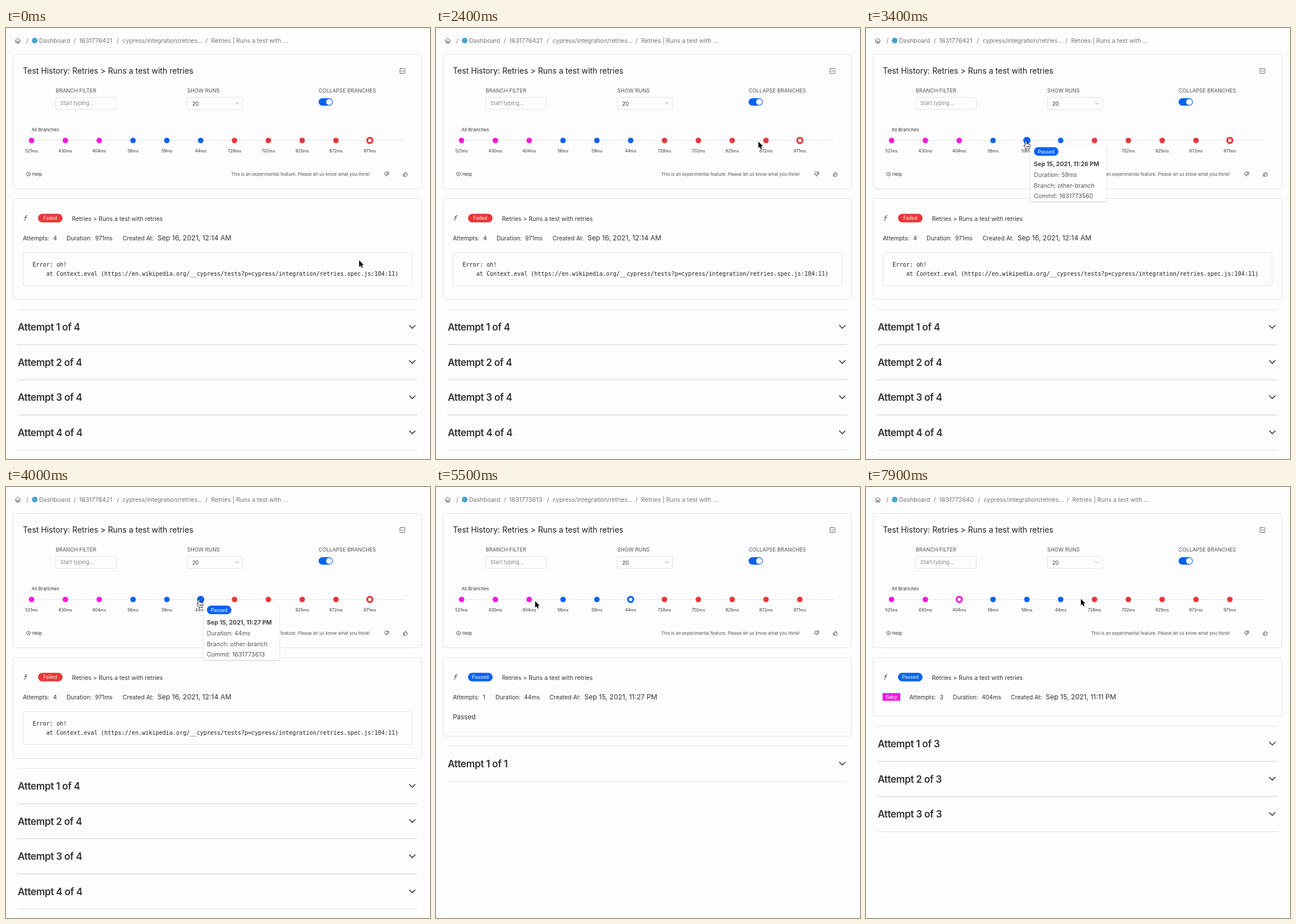
An HTML page that plays this animation: 742 px wide and 755 px high, repeating every 8000 ms.

```html
<!DOCTYPE html>
<html lang="en">
<head>
<meta charset="utf-8">
<title>Test history</title>
<style>
  html, body { margin: 0; width: 100%; height: 100%; overflow: hidden; background: #fdfcfe; }
  svg { display: block; width: 100vw; height: 100vh; fill: #333; }
  text { font-family: Inter, "Open Sans", sans-serif; }
  .mono { font-family: "DejaVu Sans Mono", monospace; fill: #222; }
  .line { fill: none; stroke: #e2e2e5; }
  .icon { fill: none; stroke: #555; stroke-width: .9; stroke-linejoin: round; stroke-linecap: round; }
  .heading { font-weight: 600; letter-spacing: -.4px; }
  .tip { fill: #fff; filter: drop-shadow(0 1px 1px #0003); }
</style>
</head>
<body>
<svg viewBox="0 0 742 755"><g id="page"></g><g id="live"></g></svg>
<script>
const LOOP = 8000, STEP = 100;
const RED = '#e83737', BLUE = '#0562f0', PINK = '#f21ade', GREY = '#777';
const durations = [521, 430, 404, 56, 59, 44, 728, 702, 925, 872, 971];
const dotX = i => 44.7 + 59.2 * i;
const dotColor = i => i < 3 ? PINK : i < 6 ? BLUE : RED;

// Details of the runs that are opened or hovered, by dot index
const runs = {
  2: { id: 1631772640, date: 'Sep 15, 2021, 11:11 PM', branch: 'tests-history-001', flaky: true,
       attempts: 3, bottom: 401.5, metaX: [76, 129, 152, 202.5, 253.5, 314.5] },
  4: { id: 1631773560, date: 'Sep 15, 2021, 11:26 PM', branch: 'other-branch' },
  5: { id: 1631773613, date: 'Sep 15, 2021, 11:27 PM', branch: 'other-branch',
       attempts: 1, bottom: 436.5, metaX: [29.5, 82, 104, 154, 198.5, 259.5] },
  9: { id: 1631776322, date: 'Sep 16, 2021, 12:12 AM', branch: 'tests-history-001', failed: true },
  10: { id: 1631776421, date: 'Sep 16, 2021, 12:14 AM', failed: true,
        attempts: 4, bottom: 475.5, metaX: [29.5, 82.5, 106, 156, 204, 265] }
};

// Pointer path: time, x, y
const path = [
  [0, 618, 407], [100, 617, 398], [700, 600, 200], [900, 599, 200], [1600, 576, 199], [1700, 576, 200],
  [2100, 579, 200], [2300, 581, 199], [3000, 278.5, 199], [3500, 280, 198], [3900, 337.5, 197],
  [4000, 337.5, 197], [4900, 335, 199], [5600, 164, 200], [6200, 165, 200], [7300, 166, 200],
  [7900, 376, 196], [8000, 376, 196]
];
// Time over a dot: start, end, dot
const hovers = [[1610, 2400, 9], [2980, 3600, 4], [3850, 5100, 5], [5550, 7400, 2]];
const TIP_DELAY = 80;
const selectedAt = t => t < 4400 ? 10 : t < 6000 ? 5 : 2;

const text = (x, y, size, str, attrs = '') =>
  `<text x="${x}" y="${y}" font-size="${size}" ${attrs}>${String(str).replace(/>/g, '&gt;')}</text>`;
const rect = (x, y, w, h, attrs) => `<rect x="${x}" y="${y}" width="${w}" height="${h}" ${attrs}/>`;
const circle = (x, y, r, attrs) => `<circle cx="${x}" cy="${y}" r="${r}" ${attrs}/>`;
const draw = (d, attrs, x = 0, y = 0, turn = 0) =>
  `<path d="${d}" transform="translate(${x} ${y}) rotate(${turn})" ${attrs}/>`;
const fill = c => `fill="${c}"`;
const centred = 'text-anchor="middle" ';
const icon = 'class="icon"', line = 'class="line"';

const statusBadge = (run, x, y) =>
  rect(x, y, 43, 15, `rx="7.5" fill="${run.failed ? RED : BLUE}"`) +
  text(x + 21.5, y + 10.8, 8.5, run.failed ? 'Failed' : 'Passed', centred + fill('#fff'));
const flakyBadge = (x, y, h) =>
  rect(x, y, 31, h, fill(PINK)) + text(x + 15.5, y + h / 2 + 3.2, 9.1, 'flaky', centred + fill('#fff'));

function page() {
  const thumb = 'M-3.4 -.4h1.6v4h-1.6zM-1.8 -.4L0 -3.6q1.4 0 1 1.7l-.3 1.2h2.6l-.6 3.7q-.2.6-.8.6h-3.7';
  return draw('M-4.5 .2L0 -4 4.5 .2M-3.3 -.6V4.3H3.3V-.6M-1 4.3V1.2H1V4.3', icon, 20.7, 21.8) +
    text(35.5, 26, 10.4, '/', fill(GREY)) +
    circle(50.2, 22, 5, fill('#48a3cf')) +
    text(58, 26, 10.5, 'Dashboard', fill(GREY)) + text(118.5, 26, 10.4, '/', fill(GREY)) +
    rect(12.5, 46.5, 715, 235, line + ' rx="3"') +
    text(29.5, 80.2, 13.86, 'Test History: Retries > Runs a test with retries', fill('#222')) +
    rect(689.5, 71, 8.6, 8.6, icon + ' rx="1"') + draw('M691.8 75.3h4', icon) +
    [[87, 'BRANCH FILTER'], [317, 'SHOW RUNS'], [547, 'COLLAPSE BRANCHES']]
      .map(([x, label]) => text(x, 113, 9.2, label, fill('#555'))).join('') +
    rect(87, 121.5, 106, 21, line + ' rx="2"') + text(95, 135.4, 9.2, 'Start typing...', fill('#888')) +
    rect(317, 121.5, 97, 21, line + ' rx="2"') + text(326, 135.6, 9.2, '20') +
    draw('M401 130.3l3.2 3.2 3.2 -3.2', icon + ' style="stroke:#999"') +
    rect(547, 123, 25, 13, `rx="6.5" fill="${BLUE}"`) + circle(565.5, 129.5, 5.3, fill('#fff')) +
    text(44.7, 180.5, 8.15, 'All Branches') +
    draw('M45 197H696', line) +
    durations.map((ms, i) => text(dotX(i), 217.6, 7.3, ms + 'ms', centred)).join('') +
    circle(39.4, 256, 3.3, icon) + draw('M39.4 255.6v2M39.4 254.2v.1', icon) +
    text(46, 258.9, 7.8, 'Help') +
    text(393.7, 258.8, 7.76, 'This is an experimental feature. Please let us know what you think!', fill('#555')) +
    draw(thumb, icon, 666, 256, 180) +
    draw(thumb, icon, 699, 256) +
    draw('M37 328.6q-2.2 -1 -2.6 1.6l-.8 5q-.4 2.4 -2 1.6M32.4 331.6h4', icon + ' style="stroke:#333"') +
    text(115.5, 337.8, 10.4, 'Retries > Runs a test with retries');
}

function details(index) {
  const run = runs[index], shift = index === 2 ? 2 : 0;
  const meta = ['Attempts:', run.attempts, 'Duration:', durations[index] + 'ms', 'Created At:', run.date];
  const dividerTop = run.bottom + 17.5;
  let out = text(128, 26, 10.6, run.id, fill(GREY)) +
    [[194, '/'], [204, 'cypress/integration/retries...'], [349, '/'], [359, 'Retries | Runs a test with ...']]
      .map(([x, s]) => text(x + shift, 26, 10.5, s, fill(GREY))).join('') +
    rect(12.5, 298.5, 715, run.bottom - 298.5, line + ' rx="3"') +
    statusBadge(run, 56, 325.5) +
    meta.map((s, i) => text(run.metaX[i], 372.2, i === 5 ? 12.05 : 10.25, s)).join('');
  if (run.flaky) out += flakyBadge(29, 361, 13.5);
  else if (!run.failed) out += text(29.5, 407, 11.5, 'Passed');
  else out += rect(29.5, 393.5, 681, 57.5, line + ' rx="2"') +
    text(46.5, 418, 9.95, 'Error: oh!', 'class="mono"') +
    text(70.4, 434.2, 9.95, 'at Context.eval (https://en.wikipedia.org/__cypress/tests?p=cypress/integration/retries.spec.js:104:11)', 'class="mono"');
  for (let i = 0; i <= run.attempts; i++) {
    const y = dividerTop + 61.6 * i, inner = i > 0 && i < run.attempts;
    out += draw(`M20 ${y}H720`, line + ` stroke-width="${inner ? 1.8 : 1}"`);
    if (i < run.attempts)
      out += text(20.5, y + 37.2, 17.1, `Attempt ${i + 1} of ${run.attempts}`, 'class="heading"') +
        draw(`M706 ${y + 28}l5 5 5 -5`, icon + ' style="stroke:#222;stroke-width:1.4"');
  }
  return out;
}

function dots(selected, hovered) {
  return durations.map((_, i) => {
    const big = i === hovered, color = dotColor(i);
    return i === selected
      ? circle(dotX(i), 197, big ? 5.8 : 4.6, `fill="#fff" stroke="${color}" stroke-width="${big ? 3.6 : 3.2}"`)
      : circle(dotX(i), 197, big ? 6.3 : 4.8, fill(color));
  }).join('');
}

function tooltip(index, x, y) {
  const run = runs[index], extra = run.flaky ? 2.5 : 0;
  const row = (n, s, attrs) => text(6, 44 + extra + 18.8 * n, 10.5, s, attrs);
  return `<g transform="translate(${x + 8} ${y})">` +
    rect(0, 9, run.branch.length > 12 ? 139 : 133, 97 + extra, 'class="tip" rx="1"') +
    statusBadge(run, 6, 10.7 + extra * .7) +
    (run.flaky ? flakyBadge(57, 12.3, 16.5) : '') +
    row(0, run.date, fill('#444') + ' font-weight="700"') +
    [`Duration: ${durations[index]}ms`, `Branch: ${run.branch}`, `Commit: ${run.id}`]
      .map((s, i) => row(i + 1, s, fill('#555'))).join('') + '</g>';
}

function pointer(x, y, hand) {
  return hand
    ? draw('M-1.3 1.2Q-1.2 -.1 0 0T1.3 1.2V5Q2.2 4.2 3.3 5.3 4.3 4.6 5.2 5.8 7.3 5.2 7.3 7.4V9.6Q7 11.5 6 12.6V14H-.2V12.8L-3.5 8.6Q-4 7 -2.6 7L-1.3 8.2Z' +
        'M1.5 8.7v2.5M3.2 8.7v2.5M4.9 8.7v2.5', 'fill="#fff" stroke="#111" stroke-width=".9" stroke-linejoin="round"', x, y)
    : draw('M0 0V11.4L2.6 9 4.3 13 6.2 12.2 4.5 8.3H8Z', 'fill="#000" stroke="#fff" paint-order="stroke"', x, y);
}

function pointerAt(t) {
  const next = Math.max(1, path.findIndex(p => p[0] > t));
  const [t0, x0, y0] = path[next - 1], [t1, x1, y1] = path[next];
  const k = (t - t0) / (t1 - t0), eased = k * k * (3 - 2 * k);
  return [x0 + (x1 - x0) * eased, y0 + (y1 - y0) * eased];
}

function render(t) {
  const [x, y] = pointerAt(t), selected = selectedAt(t);
  const hover = hovers.find(([from, to]) => t >= from && t < to);
  const open = hover && t >= hover[0] + TIP_DELAY;
  live.innerHTML = details(selected) + dots(selected, open ? hover[2] : -1) +
    (open ? tooltip(hover[2], x, y) : '') + pointer(x, y, !!hover);
}

const live = document.getElementById('live');
document.getElementById('page').innerHTML = page();
const start = performance.now();
let shown = -1;
function tick() {
  const t = Math.floor((performance.now() - start) % LOOP / STEP) * STEP;
  if (t !== shown) render(shown = t);
  requestAnimationFrame(tick);
}
tick();
</script>
</body>
</html>
```
